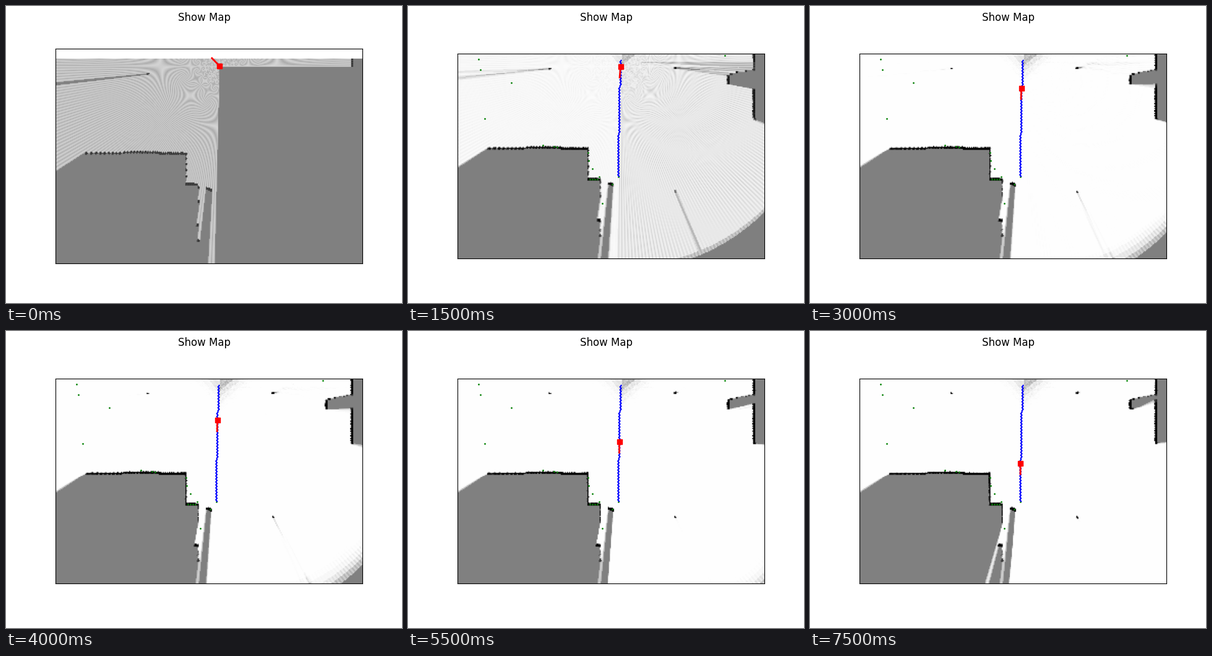
Write a matplotlib script that moves like this. It is 640 px wide and 480 px high and loops after 8000 ms.

```python
import numpy as np
import matplotlib.pyplot as plt
from matplotlib.animation import FuncAnimation

COLS, ROWS = 300, 200
CELL = 496 / COLS            # pixels per map cell
LEFT, TOP = 80, 77.07        # map corner on the stage
MAX_RANGE = 200              # cells
HALF_FAN = 134               # beams on each side, one per degree
ON_BEAM, OFF_BEAM = 1.6, 0.7  # log odds on a beam and midway between two
HIT_DEPTH = 1.3              # cells
LIMIT = 5.0
FRAMES = 16

# corners of each wall in stage pixels
WALLS = [
    [(560, 77), (560, 180)],
    [(519, 125), (519, 112), (558, 105)],
    [(130, 232), (188, 232), (190, 230), (289, 231), (289, 281), (309, 281), (309, 312)],
    [(307, 347), (310, 347), (310, 376)],
]
POSTS = [
    [(229.5, 101), (229.5, 101)],
    [(432, 100), (432, 100)],
    [(431, 300), (431, 300)],
    [(325, 286), (331, 289)],
]


def to_cell(x, y):
    return (np.asarray(x) - LEFT) / CELL - 0.5, (np.asarray(y) - TOP) / CELL - 0.5


row_grid, col_grid = np.mgrid[:ROWS, :COLS]


def add_line(solid, corners, width):
    """Fill all cells within half a width of the polyline."""
    for a, b in zip(corners, corners[1:]):
        (ax_, ay), (bx, by) = to_cell(*a), to_cell(*b)
        dx, dy = bx - ax_, by - ay
        along = (col_grid - ax_) * dx + (row_grid - ay) * dy
        s = np.clip(along / max(dx * dx + dy * dy, 1e-9), 0, 1)
        gap = np.hypot(col_grid - ax_ - s * dx, row_grid - ay - s * dy)
        solid |= gap <= width / CELL / 2


solid = np.zeros((ROWS, COLS), bool)
for wall in WALLS:
    add_line(solid, wall, 4.5)
for post in POSTS:
    add_line(solid, post, 2.6)


def cast(c0, r0, heading):
    """Range of every beam, in cells."""
    angle = np.radians(heading + np.arange(-HALF_FAN, HALF_FAN + 1))[:, None]
    t = np.arange(0, MAX_RANGE, 0.5)
    c = np.round(c0 + t * np.cos(angle)).astype(int)
    r = np.round(r0 - t * np.sin(angle)).astype(int)
    inside = (c >= 0) & (c < COLS) & (r >= 0) & (r < ROWS)
    struck = inside & solid[r.clip(0, ROWS - 1), c.clip(0, COLS - 1)]
    return np.where(struck.any(1), t[struck.argmax(1)], MAX_RANGE)


def scan(x, y, heading):
    """Log odds from one scan: each cell follows its nearest beam."""
    c0, r0 = np.round(to_cell(x, y))
    dist = np.hypot(col_grid - c0, row_grid - r0)
    bearing = np.degrees(np.arctan2(r0 - row_grid, col_grid - c0)) - heading
    bearing = (bearing + 180) % 360 - 180
    beam = np.round(bearing).astype(int)
    reach = cast(c0, r0, heading)[beam.clip(-HALF_FAN, HALF_FAN) + HALF_FAN]
    weight = ON_BEAM - 2 * (ON_BEAM - OFF_BEAM) * abs(bearing - beam)
    hit = (abs(dist - reach - 0.5) <= HIT_DEPTH) & (reach < MAX_RANGE)
    free = (dist < reach) & ~hit
    seen = abs(beam) <= HALF_FAN
    return seen * weight * (hit * 1.0 - free)


def path_center(y):
    return np.select([y < 131, y < 206], [343.6, 341.6], 340.1)


def pose(step):
    """The robot turns on the spot, then drives down the path."""
    if step < 2:
        return 345, 89, 134.1 + 88.4 * step
    y = 98 + 11.6 * (step - 2)
    return float(path_center(y)), y, 270 - 5 * 0.7 ** (step - 2)


def step_at(frame):
    # every fourth step lasts two frames
    return frame - (frame + 3) // 5


odds = np.zeros((ROWS, COLS))
maps = []
for step in range(step_at(FRAMES - 1) + 1):
    odds = np.clip(odds + scan(*pose(step)), -LIMIT, LIMIT)
    maps.append(1 / (1 + np.exp(odds)))

fig, ax = plt.subplots(figsize=(6.4, 4.8), dpi=100)
fig.suptitle("Show Map")
image = ax.imshow(maps[0], cmap="gray", vmin=0, vmax=1)
ax.set_xticks([])
ax.set_yticks([])

# green marks: a few loose ones, the rest following the walls
loose = [(114, 86), (117, 103), (167, 124), (124, 182), (512, 80),
         (330, 288), (314, 319), (340, 276)]
ledge = [(218 + 23 * s, 225 + 3 * s) for s in (0, 0.8, 1)]
bend = [(291 + 18 * s ** 2.5, 237 + 39 * s) for s in np.linspace(0, 1, 4)]
sill = [(x, 280) for x in range(294, 308, 4)]
marks, = ax.plot(*to_cell(*zip(*loose, *ledge, *bend, *sill)), "o",
                 color="green", ms=2, mew=0)

path_y = np.arange(88, 277, 2.4)
path_x = path_center(path_y) + (-1.0) ** np.arange(len(path_y))
path, = ax.plot(*to_cell(path_x, path_y), "b-", lw=1.5)
pointer, = ax.plot([], [], "r-", lw=2)
robot, = ax.plot([], [], "rs")


def draw(frame):
    step = step_at(frame)
    x, y, heading = pose(step)
    angle = np.radians(heading)
    tip_x, tip_y = x + 17.5 * np.cos(angle), y - 17.5 * np.sin(angle)
    image.set_data(maps[step])
    pointer.set_data(*to_cell([x, tip_x], [y, tip_y]))
    robot.set_data(*to_cell([x], [y]))
    path.set_visible(step > 0)
    marks.set_visible(step > 0)
    # the first view keeps a margin above the map
    ax.set_xlim(-0.5, COLS - 0.5)
    ax.set_ylim(ROWS - 0.5, -0.5 if step else -10)
    return image, marks, path, pointer, robot


anim = FuncAnimation(fig, draw, frames=FRAMES, interval=500,
                     repeat=True, repeat_delay=0, blit=False)
plt.show()
```
